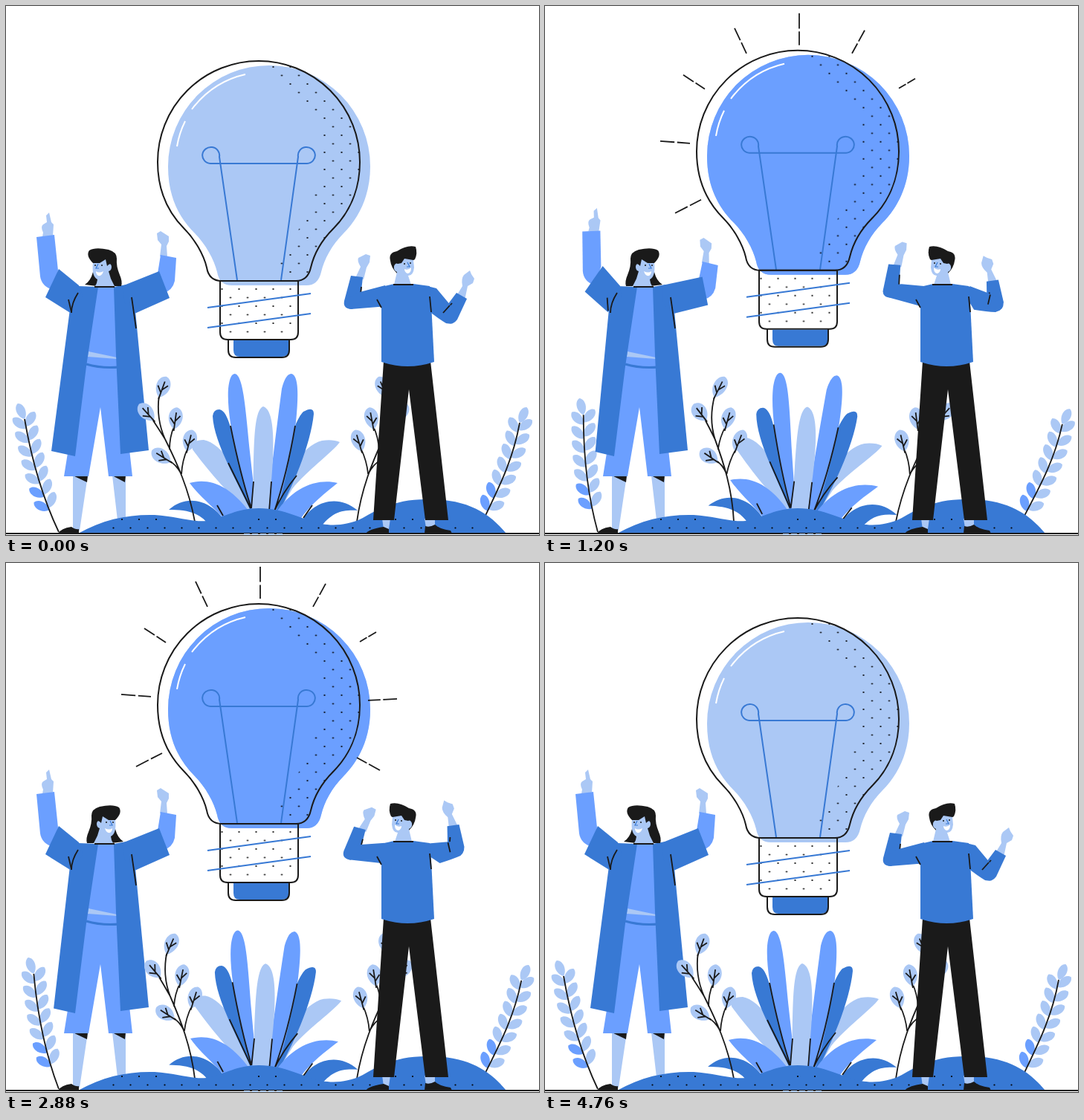
Animation of 717 by 712 pixels, one loop 4.8 s. Source, as an HTML page:

```html
<!DOCTYPE html>
<html lang="en">
<head>
<meta charset="utf-8">
<title>Bright idea</title>
<style>
  html, body { margin: 0; width: 100%; height: 100%; overflow: hidden; background: #fff; }
  svg { display: block; width: 717px; height: 712px; stroke-width: 1.8; }
  .light { fill: #abc8f5; } .mid { fill: #6b9fff; } .dark { fill: #3879d4; }
  .ink { fill: #1a1a1a; } .white { fill: #fff; }
  .line { fill: none; stroke: #1a1a1a; }
  .wire { fill: none; stroke: #3879d4; }
  .glint { fill: none; stroke: #fff; }
</style>
</head>
<body>
<svg viewBox="0 0 717 712">
  <defs>
    <pattern id="dots" patternUnits="userSpaceOnUse" x="353.5" y="76" width="23" height="23">
      <circle cx="6" cy="6" r="1.1"/><circle cx="17.5" cy="17.5" r="1.1"/>
    </pattern>
    <pattern id="hillDots" href="#dots" x="150" y="685"/>
    <path id="glass" d="M340 74A136 136 0 0 1 476 210C476 250 460 280 440 300C424 316 414 335 410 352Q406 370 390 370H290Q273 370 270 352C266 335 254 314 240 300C218 278 204 250 204 210A136 136 0 0 1 340 74Z"/>
    <clipPath id="inGlass"><use href="#glass"/></clipPath>
    <path id="blade" d="M0 0C-8-6-8-20 0-23C8-20 8-6 0 0"/>
    <g id="leaf">
      <path class="light" d="M0 15C-14 5-11-13 0-15C11-13 14 5 0 15"/>
      <path class="line" d="M0 17V-8M0 8L-7 0M0 4L6-4"/>
    </g>
    <g id="branch">
      <path class="line" d="M254 694C246 650 230 615 214 583C206 565 203 545 206 524M214 583Q206 570 196 555M220 597Q220 580 226 566M236 630Q237 612 244 596M236 630Q228 616 218 611"/>
      <use href="#leaf" transform="translate(211 513) rotate(20)"/>
      <use href="#leaf" transform="translate(189 547) rotate(-42)"/>
      <use href="#leaf" transform="translate(228 555) rotate(8)"/>
      <use href="#leaf" transform="translate(247 585) rotate(14)"/>
      <use href="#leaf" transform="translate(209 606) rotate(-58)"/>
    </g>
  </defs>

  <g id="grassL"></g>
  <g id="grassR"></g>
  <use id="branchR" href="#branch"/>

  <!-- woman -->
  <path class="light" d="M90 632H110L99 706H90ZM143 632H161V692H150Z"/>
  <path class="ink" d="M90 632H110L109 641ZM143 632H161L160 641ZM70 710Q74 703 88 701Q94 705 98 704V710Z"/>
  <path class="mid" d="M122 378H146L152 470L170 633H138L127 540L111 633H78L104 470Z"/>
  <path class="light" d="M111 465L149 473V475L110 472Z"/>
  <path class="wire" stroke-width="3" d="M108 482Q128 488 152 486"/>
  <path id="coat" class="dark"/>
  <path class="dark" d="M145 378L162 375L173 400L192 598L154 603L148 470Z"/>
  <g id="armWL">
    <g id="foreWL">
      <path class="light" d="M49 310L50 305Q46 297 50 294L55 291L54 282L58 278L61 291L64 294L63 310Z"/>
      <path class="mid" d="M41 311L65 308L70 356L64 382Q48 378 46 364Z"/>
    </g>
    <path class="dark" d="M71 354L98 376L104 392L88 414L53 392Z"/>
    <path class="line" d="M84 395L88 412"/>
  </g>
  <path class="line" d="M97 386Q88 400 88 413"/>
  <g id="armWR">
    <g id="foreWR">
      <path class="light" d="M203 306L208 303L219 310V317L216 323L217 338L207 337L209 321L204 315Z"/>
      <path class="mid" d="M208 335L229 339L227 370Q224 383 212 386L204 360Z"/>
    </g>
    <path class="dark" d="M156 377L206 357L220 393L173 414L160 400Z"/>
  </g>
  <path class="line" d="M169 392L175 434"/>
  <g id="headW">
    <path class="ink" d="M117 346V358Q114 370 106 375L122 377H155Q157 371 153 362Q148 350 149 340Q149 331 138 328Q120 324 112 329Q107 336 117 346"/>
    <path class="light" d="M117 346L126 346L134 341L136 350Q141 344 142 351Q142 356 138 357L141 367L146 377H120L122 373L123 368Q115 364 117 346Z"/>
    <path class="white" d="M121 357Q125 360 131 357Q129 364 124 363Q121 361 121 357"/>
    <path class="wire" stroke-width="1.2" d="M124 347L121 353H125"/>
    <path class="line" stroke-width="1.4" d="M119 349H121M128 349H130"/>
  </g>
  <path class="line" stroke-width="2" d="M119 378H146"/>

  <g id="bush">
    <path class="light" d="M338 690C300 660 268 620 251 597C249 588 255 584 266 584C290 588 318 630 342 690ZM346 690C365 640 400 590 425 585Q440 583 449 587C440 600 405 625 385 650Q370 675 365 690Z"/>
    <path class="dark" d="M334 690C312 640 280 590 278 552Q279 543 287 543C300 545 305 580 312 610L338 690ZM354 690C364 640 385 560 400 546Q414 538 414 549C410 590 385 650 362 690Z"/>
    <path class="mid" d="M334 690C318 640 296 560 299 515Q301 495 308 495C319 497 322 540 328 600L338 690ZM350 690C355 640 365 560 371 515Q376 495 384 495C393 497 394 520 390 560C380 620 372 660 360 690Z"/>
    <path class="light" d="M330 690C336 640 328 545 346 539C366 545 360 620 352 690Z"/>
    <path class="mid" d="M334 690C300 640 270 636 247 642C260 660 280 675 295 692ZM358 690C385 645 420 636 446 642C430 655 410 670 395 692Z"/>
    <path class="dark" d="M300 702C280 665 245 655 219 678C240 678 262 680 275 702ZM396 697C410 668 445 655 473 679C450 678 440 682 425 699Z"/>
    <path class="line" d="M302 565Q315 630 330 676M299 615L329 676M333 640L330 676M357 640L354 680M389 565Q378 630 361 680M391 632Q372 655 361 680M284 672L292 686M412 672L400 689"/>
  </g>
  <use id="branchL" href="#branch"/>

  <path id="hill" class="dark" d="M97 710C130 691 165 684 200 685C230 687 250 695 270 693C295 688 310 676 340 676C375 676 400 692 425 697C440 700 460 699 480 689C505 674 530 664 565 664C620 663 650 682 673 710Z"/>
  <path fill="url(#hillDots)" d="M140 696H640V708H140ZM150 687H210V696H150ZM335 687H370V696H335ZM500 687H580V696H500Z"/>
  <path class="line" stroke-width="2" d="M0 710H717"/>
  <path stroke="#abc8f5" stroke-dasharray="8 3" d="M320 711H375"/>

  <!-- man -->
  <path class="light" d="M506 690H517L515 704H508ZM563 690H577V702H565Z"/>
  <path class="ink" d="M484 710Q488 704 508 701L515 704V710ZM563 710L564 700Q570 702 577 698Q583 704 598 706L600 710Z"/>
  <path class="ink" d="M508 478H571L595 692H564L542 516L522 692H494Z"/>
  <g id="armMR">
    <g id="foreMR">
      <path class="light" d="M606 390L614 377Q612 367 616 362L624 356L626 361L630 367L628 373L621 377L617 396Z"/>
      <path class="dark" d="M606 386L620 394L607 422Q600 431 592 426L588 410Z"/>
      <path class="line" d="M600 400L588 413"/>
    </g>
    <path class="dark" d="M567 377L579 380L594 398L607 414Q604 429 592 427Q582 421 568 410Z"/>
    <path class="line" d="M597 403L588 413"/>
  </g>
  <g id="armML">
    <g id="foreML">
      <path class="light" d="M470 366L477 351Q472 343 474 339L484 334L490 336L489 345L485 352L481 368Z"/>
      <path class="dark" d="M464 363L480 365L477 392L466 408Q453 408 455 397Z"/>
      <path class="line" d="M478 378L476 398"/>
    </g>
    <path class="dark" d="M510 376L476 385L457 394Q452 406 464 408L512 404Z"/>
  </g>
  <path class="dark" d="M505 378L522 374H548L570 377L572 400L576 479Q540 491 505 479Z"/>
  <path class="line" d="M499 395L505 406M570 391L572 412"/>
  <g id="headM">
    <path class="ink" d="M517 343Q514 332 526 330Q540 321 551 324Q554 333 550 341L530 352L526 360Q518 352 517 343"/>
    <path class="light" d="M527 347L532 346L536 340L548 342L549 352Q548 363 541 363L545 375H522L526 358Q521 356 522 350Q524 345 527 347Z"/>
    <path class="white" d="M536 354Q541 356 545 352Q545 360 540 360Q536 358 536 354"/>
    <path class="wire" stroke-width="1.2" d="M540 345L543 351H539"/>
    <path class="line" stroke-width="1.4" d="M535 347H537M543 346H545"/>
  </g>
  <path class="line" stroke-width="2" d="M521 375H548"/>

  <g id="bulb">
    <g transform="translate(14 6)">
      <use href="#glass" class="light"/>
      <use id="glow" href="#glass" class="mid"/>
    </g>
    <path clip-path="url(#inGlass)" fill="url(#dots)" d="M346 74L424 151V244L412 256L400 290L366 347L376 366H500V74Z"/>
    <path class="wire" stroke-width="2" d="M311 369L287 203A11.5 11 0 1 0 275 212H405A11.5 11 0 1 0 393 203L370 369"/>
    <path class="glint" stroke-width="2" d="M250 139Q278 102 322 92M230 189Q233 171 241 155"/>
    <use href="#glass" class="line" stroke-width="2"/>
    <path fill="url(#dots)" d="M289 375H392V444H289Z"/>
    <path class="line" stroke-width="2" d="M288 370H393V439Q393 449 383 449H298Q288 449 288 439Z"/>
    <path class="wire" stroke-width="2" d="M271 406L410 387M271 433L410 414"/>
    <path class="dark" d="M306 450H381V463Q381 472 371 472H314Q306 472 306 463Z"/>
    <path class="line" stroke-width="2" d="M299 449V463Q299 473 309 473H371Q381 473 381 463V449"/>
    <g id="rays"></g>
  </g>
</svg>
<script>
const LOOP = 4800;
const el = id => document.getElementById(id);
const mix = (a, b, k) => a + (b - a) * k;
const linear = k => k;
const smooth = k => (1 - Math.cos(Math.PI * k)) / 2;

// Value at time t along [time, value] stops
function track(t, stops, ease = smooth) {
  const next = stops.findIndex(s => s[0] > t);
  if (next < 0) return stops[stops.length - 1][1];
  if (next === 0) return stops[0][1];
  const [t0, a] = stops[next - 1], [t1, b] = stops[next];
  return mix(a, b, ease((t - t0) / (t1 - t0)));
}

const turn = (id, angle, x, y) => el(id).setAttribute('transform', `rotate(${angle} ${x} ${y})`);
const flip = (id, on, axis) =>
  el(id).setAttribute('transform', on ? `matrix(-1 0 0 1 ${2 * axis} 0)` : '');

// Stem with paired leaves; the two lowest on the left are darker
function growGrass(id, stem, count, side) {
  const group = el(id);
  group.innerHTML = `<path class="line" d="${stem}"/>`;
  const path = group.firstChild, length = path.getTotalLength();
  const leaf = (at, lean, tone) => {
    const p = path.getPointAtLength(at), q = path.getPointAtLength(at - 2);
    const angle = Math.atan2(p.y - q.y, p.x - q.x) * 180 / Math.PI + 90 + lean;
    return `<use href="#blade" class="${tone}" transform="translate(${p.x} ${p.y}) rotate(${angle})"/>`;
  };
  let leaves = leaf(length, -14 * side, 'light');
  for (let i = 0; i < count; i++) {
    const at = length - 13 - i * 19;
    leaves += leaf(at, -42, i > count - 3 ? 'mid' : 'light') + leaf(at + 3, 42, 'light');
  }
  group.insertAdjacentHTML('afterbegin', leaves);
}
growGrass('grassL', 'M71 708C52 668 36 620 25 556', 7, 1);
growGrass('grassR', 'M640 696C662 650 682 612 691 561', 7, -1);

const rays = [
  [175, 293, 210, 275], [155, 196, 195, 199], [186, 107, 215, 126],
  [255, 44, 271, 78], [342, 24, 342, 67], [430, 47, 413, 78],
  [498, 112, 476, 125], [526, 202, 487, 204], [503, 298, 472, 281]
];
el('rays').innerHTML = rays.map(([x, y, u, v]) =>
  `<path class="line" pathLength="100" stroke-dasharray="48 9 43 0" d="M${x} ${y}L${u} ${v}"/>`).join('');

const lift = [[0, 0], [560, -8], [880, -11.4], [1200, -14.2], [1680, -18.4], [2360, -24.3],
  [2800, -20], [3480, -12.2], [4160, -5.9], [4760, 0]];

function draw(t) {
  const sway = track(t % 2400, [[0, 0], [1040, 1], [2140, 0]]);
  turn('grassL', 10.4 * sway, 71, 708);
  turn('grassR', 2.3 * sway, 645, 690);
  turn('bush', 2.7 * sway, 340, 690);
  const skew = 0.139 * sway, back = 0.06 * sway - 0.045;
  el('branchL').setAttribute('transform', `matrix(1 0 ${-skew} 1 ${694 * skew} 0)`);
  el('branchR').setAttribute('transform', `matrix(-1 0 ${-back} 1 ${726 + 694 * back} 0)`);
  el('coat').setAttribute('d', `M97 377L124 378L108 485L93 606L${61 + 7 * sway} ${599 + sway}L86 408Z`);

  const wave = track(t, [[240, 0], [800, 1], [880, 1], [1500, 0]]);
  turn('armWL', 20 * wave, 98, 392);
  turn('foreWL', -10 * wave, 58, 368);
  turn('armWR', 21 * wave, 165, 393);
  turn('foreWR', -15 * wave, 218, 378);
  flip('headW', t > 440 && t < 2900, 132);

  const pose = (b, c) => track(t, [[240, 0], [800, b], [1280, b], [1880, c], [3500, c], [4040, 0]]);
  turn('armML', pose(20, 11), 508, 390);
  turn('foreML', pose(-23, -3), 464, 398);
  turn('armMR', pose(-29, -55), 570, 392);
  turn('foreMR', pose(-9, 17), 598, 416);
  flip('headM', t > 440 && t < 3800, 534);

  el('bulb').setAttribute('transform', `translate(0 ${track(t, lift, linear)})`);
  el('glow').setAttribute('opacity', track(t, [[480, 0], [680, 1], [3720, 1], [3920, 0]]));
  [...el('rays').children].forEach((ray, i) => {
    const lit = t >= 680 + 80 * i && t < 4460 - 80 * i;
    ray.setAttribute('visibility', lit ? 'visible' : 'hidden');
  });
}

const start = performance.now();
function tick() {
  draw((performance.now() - start) % LOOP);
  requestAnimationFrame(tick);
}
tick();
</script>
</body>
</html>
```
